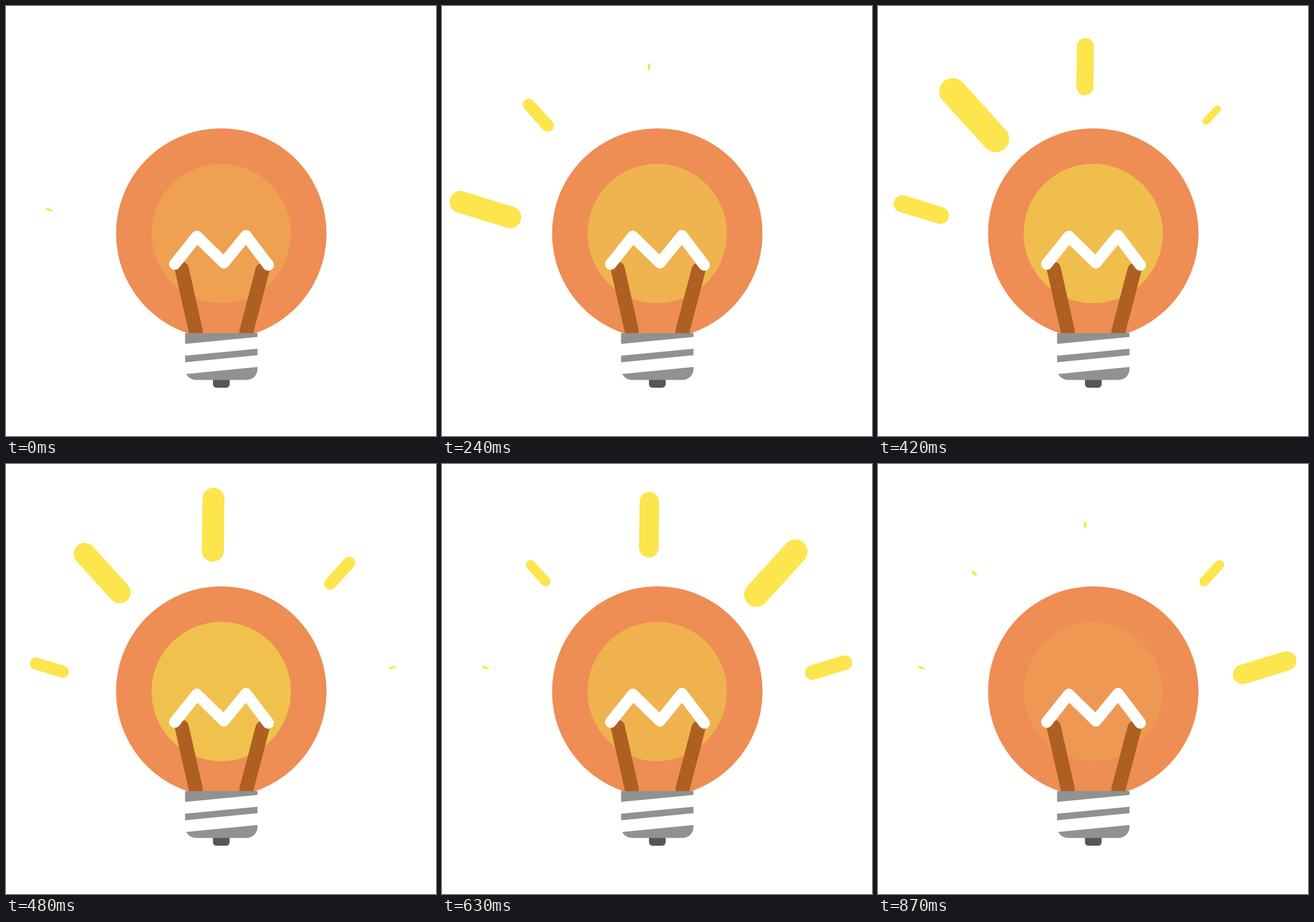
An HTML page with a canvas for the animation above (900 ms loop, 748 px wide and 748 px high).

```html
<!DOCTYPE html>
<html lang="en">
<head>
<meta charset="utf-8">
<title>Light bulb</title>
<style>
  html, body { margin: 0; width: 100%; height: 100%; overflow: hidden; background: #fff; }
  canvas { display: block; }
</style>
</head>
<body>
<canvas id="stage" width="748" height="748"></canvas>
<script>
const ctx = document.getElementById('stage').getContext('2d');
const SIZE = 748, LOOP = 900, STEP = 30;
const RAY_GROW = 300, RAY_GAP = 120, RAY_MIN = 0.07;
const GLOW_PEAK = 480;

// The right-hand rays mirror the left-hand ones.
const leftRays = [{ x: 75.4, y: 354.2, tilt: 17 }, { x: 167.4, y: 189.9, tilt: 47.7 }];
const mirror = ({ x, y, tilt }) => ({ x: SIZE - x, y, tilt: -tilt });
const rays = [...leftRays, { x: 360.3, y: 105.6, tilt: 90.6 }, ...leftRays.map(mirror).reverse()];

function glowAt(t) {
  return t < GLOW_PEAK
    ? 0.36 + 0.64 * (t / GLOW_PEAK) ** 0.82
    : 1 - (t - GLOW_PEAK) / 494;
}

function mix(from, to, k) {
  return `rgb(${from.map((c, i) => Math.round(c + (to[i] - c) * k)).join(',')})`;
}

function disc(x, y, r, color) {
  ctx.fillStyle = color;
  ctx.beginPath();
  ctx.arc(x, y, r, 0, Math.PI * 2);
  ctx.fill();
}

function stroke(points, width, color) {
  ctx.strokeStyle = color;
  ctx.lineWidth = width;
  ctx.lineCap = ctx.lineJoin = 'round';
  ctx.beginPath();
  points.forEach(([x, y]) => ctx.lineTo(x, y));
  ctx.stroke();
}

function cup(x, y, width, height, radius, color) {
  ctx.fillStyle = color;
  ctx.beginPath();
  ctx.roundRect(x, y, width, height, [0, 0, radius, radius]);
  ctx.fill();
}

function drawRay({ x, y, tilt }, age) {
  if (age < 0) return;
  const peak = Math.max(0, 1 - Math.abs(age - RAY_GROW) / RAY_GROW);
  const scale = RAY_MIN + (1 - RAY_MIN) * peak;
  const angle = tilt * Math.PI / 180;
  const dx = Math.cos(angle) * 55.6 * scale, dy = Math.sin(angle) * 55.6 * scale;
  stroke([[x - dx, y - dy], [x + dx, y + dy]], 46 * scale + 0.8, '#fce54d');
}

function drawBase() {
  cup(360, 650, 29, 14, 6, '#565656');
  cup(311.5, 569, 126, 81.5, 19, '#919191');

  // Slanted gaps between the screw threads.
  ctx.fillStyle = '#fff';
  for (let i = 0; i < 2; i++) {
    ctx.save();
    ctx.transform(1, -0.097, 0, 1, 374.5, 581.8 + 31.8 * i);
    ctx.fillRect(-65, 0, 130, 20.5);
    ctx.restore();
  }
}

function draw(t) {
  ctx.fillStyle = '#fff';
  ctx.fillRect(0, 0, SIZE, SIZE);
  rays.forEach((ray, i) => drawRay(ray, t - i * RAY_GAP));

  disc(374.5, 395.8, 183.1, '#ee8d54');
  disc(374.4, 395.8, 121.2, mix([238, 141, 84], [240, 194, 77], glowAt(t)));
  stroke([[305.7, 457], [330, 565]], 24.5, '#ad6022');
  stroke([[446.2, 459], [418.2, 566]], 24.5, '#ad6022');
  stroke([[293.5, 449], [332, 400.7], [379, 446.8], [417.5, 399.4], [456.3, 450.7]], 19.8, '#fff');
  drawBase();
}

const start = performance.now();
function tick() {
  const t = (performance.now() - start) % LOOP;
  draw(Math.floor(t / STEP) * STEP);
  requestAnimationFrame(tick);
}
tick();
</script>
</body>
</html>
```
